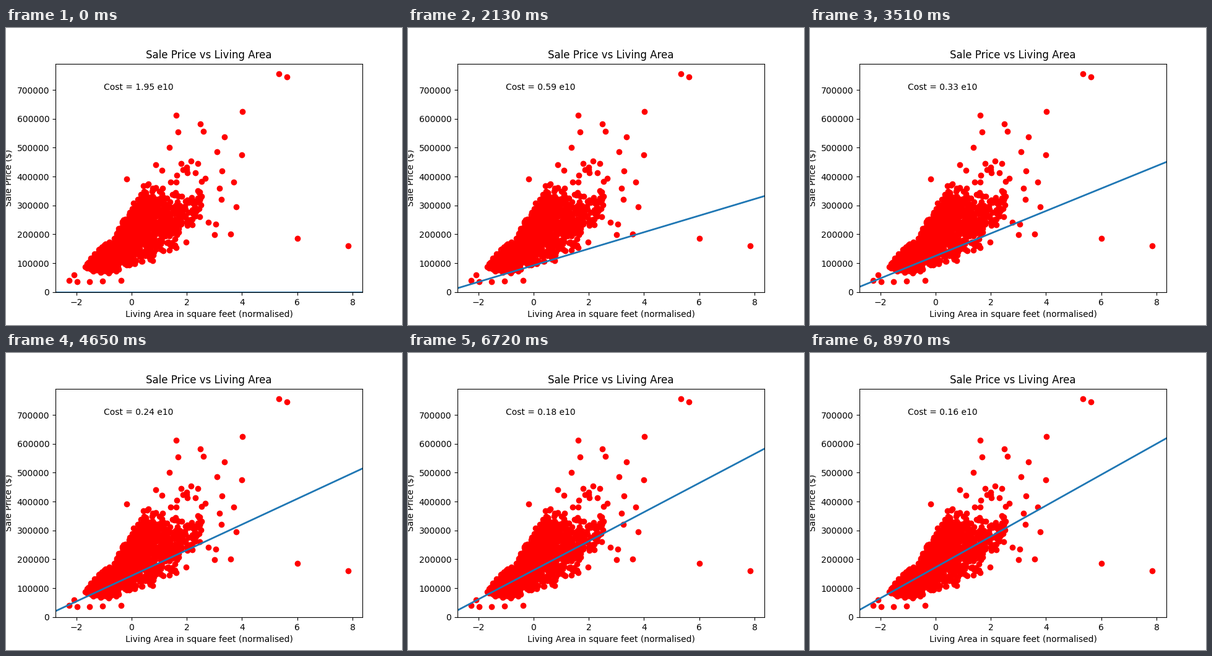
A matplotlib script for the animation above (9 s loop, 640 px wide and 480 px high).

```python
import numpy as np
import matplotlib.pyplot as plt
from matplotlib.animation import FuncAnimation

FRAMES, INTERVAL = 300, 30
MEAN, SLOPE = 180921, 56294         # least-squares fit
COST_MIN, COST_GAP = 0.157, 1.795   # in units of 1e10
RATE = 0.01

rng = np.random.default_rng(7)


def fit(x):
    return MEAN + SLOPE * x


def market(count):
    """Log-normal living areas, prices spread around the fit."""
    area = np.exp(rng.normal(7.268, 0.334, count))
    x = (area - 1515) / 525.5
    x = x[(x > -1.7) & (x < 2.6)]
    low = np.interp(x, [-1.7, -0.8, 0.3, 1.7, 2.6], [75e3, 58e3, 95e3, 110e3, 270e3])
    high = np.interp(x, [-1.7, -1.0, -0.7, -0.2, 0.5, 1.0, 1.3, 2.6],
                     [92e3, 179e3, 182e3, 275e3, 385e3, 395e3, 355e3, 360e3])
    mode = np.clip(fit(x), low, high)
    return x, rng.triangular(low, mode, high)


def upscale(count):
    """Thin band of dearer homes above the crowd."""
    x = rng.uniform(1, 2.7, count)
    return x, rng.uniform(380e3, 460e3, count)


# Homes that stand clearly apart: area, price in thousands
apart = np.array([
    (-2.25, 39.3), (-2.07, 60), (-1.97, 35), (-1.52, 35), (-1.05, 38),
    (-0.38, 40), (-0.17, 392), (0.88, 441), (1.37, 500), (1.62, 612),
    (1.69, 555), (2.5, 582), (2.59, 557), (3.1, 485), (3.37, 537),
    (3.99, 475), (4.02, 625), (5.33, 755), (5.634, 745), (6.014, 184.75),
    (7.853, 160), (3.69, 381), (3.78, 295), (3.27, 420), (3.19, 359),
    (3.26, 320), (3.59, 200), (3.0, 198), (3.05, 235), (2.78, 241),
])

homes = np.hstack([market(1460), upscale(14), (apart * (1, 1000)).T])

fig, ax = plt.subplots(figsize=(6.4, 4.8), dpi=100)
ax.set(xlim=(-2.753, 8.358), ylim=(-1105, 791005),
       title="Sale Price vs Living Area",
       xlabel="Living Area in square feet (normalised)",
       ylabel="Sale Price ($)")
ax.scatter(*homes, color="red")
line, = ax.plot([], [], lw=2)
label = ax.text(-1, 700000, "")
xs = np.array([-5, 20])


def update(step):
    left = (1 - RATE) ** step    # share of the error still to descend
    line.set_data(xs, (1 - left) * fit(xs))
    label.set_text(f"Cost = {COST_MIN + COST_GAP * left ** 2:.2f} e10")
    return line, label


anim = FuncAnimation(fig, update, frames=FRAMES, interval=INTERVAL,
                     repeat=True, repeat_delay=0)
plt.show()
```
